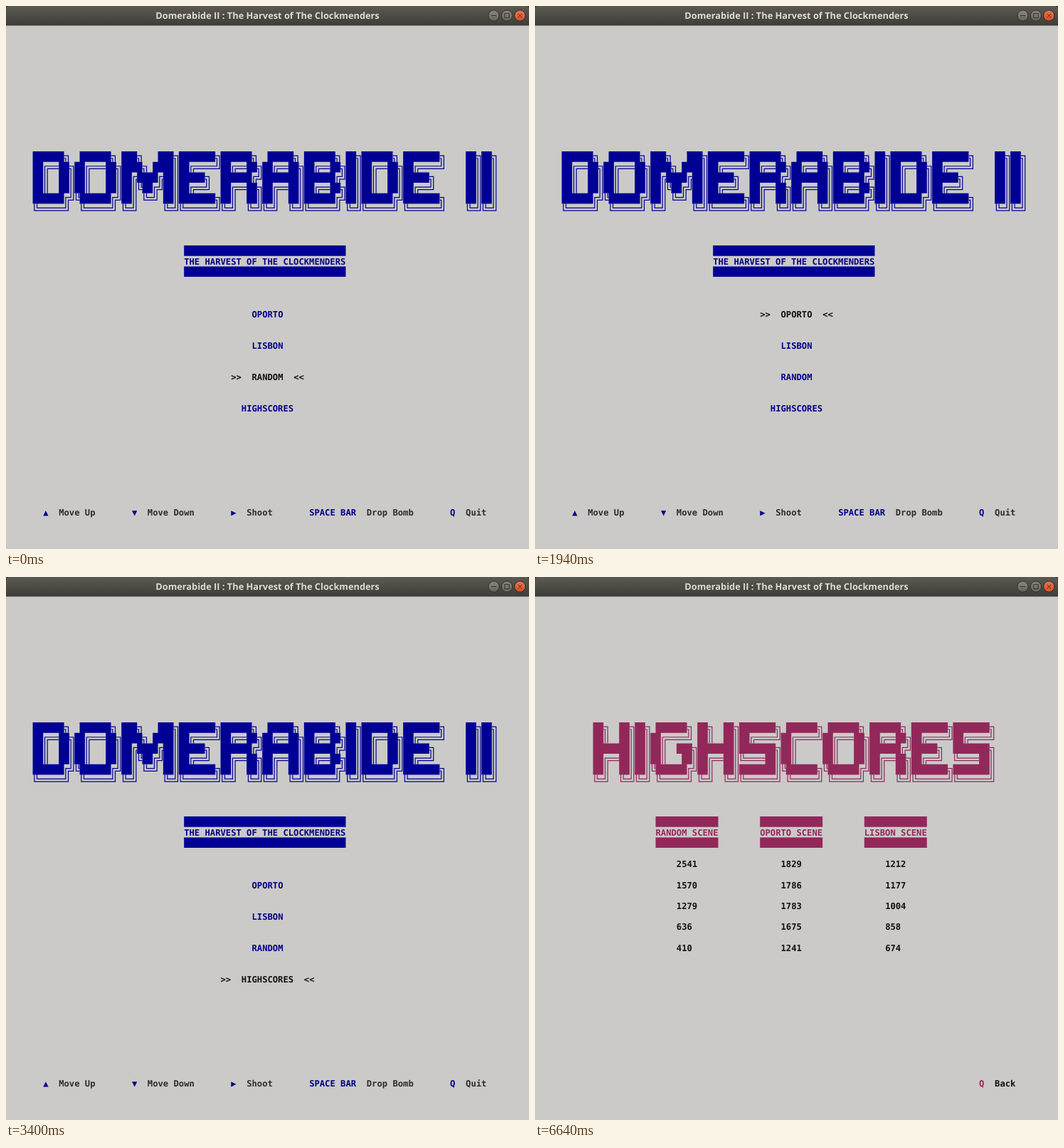
An HTML page that plays this animation: 735 by 762 pixels, repeating every 8 s.

```html
<!DOCTYPE html>
<html lang="en">
<head>
<meta charset="utf-8">
<title>Domerabide II</title>
<style>
  html, body { margin: 0; width: 100%; height: 100%; overflow: hidden; background: #cbcac8; }
  svg { display: block; width: 100vw; height: 100vh; }
  text { white-space: pre; text-rendering: geometricPrecision; }
  .cell { font: bold 12.18px "DejaVu Sans Mono", monospace; }
  .caption { font: bold 12.8px "Open Sans", sans-serif; fill: #dfdbd2; text-anchor: middle; }
</style>
</head>
<body>
<svg id="stage" viewBox="0 0 735 762" xmlns="http://www.w3.org/2000/svg">
  <defs>
    <linearGradient id="bar" x2="0" y2="1">
      <stop offset="0" stop-color="#5b5a52"/>
      <stop offset="1" stop-color="#3d3c37"/>
    </linearGradient>
    <linearGradient id="grey" x2="0" y2="1">
      <stop offset="0" stop-color="#8a887e"/>
      <stop offset="1" stop-color="#65635b"/>
    </linearGradient>
    <linearGradient id="red" x2="0" y2="1">
      <stop offset="0" stop-color="#f0774f"/>
      <stop offset="1" stop-color="#d94a22"/>
    </linearGradient>
  </defs>
  <rect width="735" height="762" fill="#cbcac8"/>
  <rect width="735" height="12" fill="#7c1a20"/>
  <path d="M0 27.6V5Q0 0 5 0H730Q735 0 735 5V27.6Z" fill="url(#bar)"/>
  <text class="caption" x="367.5" y="18">Domerabide II : The Harvest of The Clockmenders</text>
  <g stroke="#32312d" fill="none">
    <circle cx="685.5" cy="13.5" r="7.6" fill="url(#grey)"/>
    <circle cx="704" cy="13.5" r="7.6" fill="url(#grey)"/>
    <circle cx="722.3" cy="13.5" r="7.6" fill="url(#red)"/>
    <path d="M682 13.5h7M700.8 10.4h6.4v6.2h-6.4zM719.6 10.8l5.4 5.4m0-5.4l-5.4 5.4"/>
  </g>
</svg>
<script>
// Terminal grid of 100 x 50 cells, 8 x 16 units each, with a one unit margin
const UNIT = 735 / 802;
const CELL_W = 8 * UNIT, CELL_H = 16 * UNIT, LEFT = UNIT, TOP = 28.15;
const BLUE = '#000095', NAVY = '#00008a', INK = '#101010', GREY = '#2c2c2c', PLUM = '#92285a';
const LOOP = 8000, SCORES = 4;

// [start in ms, highlighted menu item or SCORES]
const STEPS = [[0, 2], [500, 1], [1400, 0], [2300, 1], [3100, 2], [3400, 3], [4600, SCORES]];

const FONT = {
  A: ' █████╗ /██╔══██╗/███████║/██╔══██║/██║  ██║/╚═╝  ╚═╝',
  B: '██████╗ /██╔══██╗/██████╔╝/██╔══██╗/██████╔╝/╚═════╝ ',
  C: ' ██████╗/██╔════╝/██║     /██║     /╚██████╗/ ╚═════╝',
  D: '██████╗ /██╔══██╗/██║  ██║/██║  ██║/██████╔╝/╚═════╝ ',
  E: '███████╗/██╔════╝/█████╗  /██╔══╝  /███████╗/╚══════╝',
  G: ' ██████╗ /██╔════╝ /██║  ███╗/██║   ██║/╚██████╔╝/ ╚═════╝ ',
  H: '██╗  ██╗/██║  ██║/███████║/██╔══██║/██║  ██║/╚═╝  ╚═╝',
  I: '██╗/██║/██║/██║/██║/╚═╝',
  M: '███╗   ███╗/████╗ ████║/██╔████╔██║/██║╚██╔╝██║/██║ ╚═╝ ██║/╚═╝     ╚═╝',
  O: ' ██████╗ /██╔═══██╗/██║   ██║/██║   ██║/╚██████╔╝/ ╚═════╝ ',
  R: '██████╗ /██╔══██╗/██████╔╝/██╔══██╗/██║  ██║/╚═╝  ╚═╝',
  S: '███████╗/██╔════╝/███████╗/╚════██║/███████║/╚══════╝',
  ' ': '    /    /    /    /    /    '
};

const stage = document.getElementById('stage');
const px = col => LEFT + col * CELL_W;
const py = row => TOP + row * CELL_H;

function add(parent, tag, attrs = {}) {
  const el = document.createElementNS('http://www.w3.org/2000/svg', tag);
  for (const key in attrs) el.setAttribute(key, attrs[key]);
  return parent.appendChild(el);
}

function write(parent, col, row, string, fill) {
  add(parent, 'text', { class: 'cell', x: px(col), y: py(row) + 12.5, fill }).textContent = string;
}

// Double-line box characters, drawn edge to edge inside one cell
function boxLines(char, col, row) {
  const l = px(col), r = px(col + 1), t = py(row), b = py(row + 1);
  const x1 = l + 2.5 * UNIT, x2 = l + 6.5 * UNIT, y1 = t + 6.5 * UNIT, y2 = t + 10.5 * UNIT;
  return {
    '═': `M${l} ${y1}H${r}M${l} ${y2}H${r}`,
    '║': `M${x1} ${t}V${b}M${x2} ${t}V${b}`,
    '╗': `M${l} ${y1}H${x2}V${b}M${l} ${y2}H${x1}V${b}`,
    '╔': `M${r} ${y1}H${x1}V${b}M${r} ${y2}H${x2}V${b}`,
    '╚': `M${x1} ${t}V${y2}H${r}M${x2} ${t}V${y1}H${r}`,
    '╝': `M${x2} ${t}V${y2}H${l}M${x1} ${t}V${y1}H${l}`
  }[char] || '';
}

function block(col, row, cols) {
  return `M${px(col)} ${py(row)}H${px(col + cols)}V${py(row + 1)}H${px(col)}z`;
}

function banner(parent, col, row, word, color) {
  let solid = '', lines = '';
  for (const letter of word) {
    const rows = FONT[letter].split('/');
    rows.forEach((line, j) => {
      for (const run of line.matchAll(/█+/g)) solid += block(col + run.index, row + j, run[0].length);
      [...line].forEach((char, i) => lines += boxLines(char, col + i, row + j));
    });
    col += rows[0].length;
  }
  add(parent, 'path', { d: solid, fill: color });
  add(parent, 'path', { d: lines, fill: 'none', stroke: color, 'stroke-width': 1.2 });
}

function heading(parent, col, string, color, ink = color) {
  const size = string.length;
  add(parent, 'path', { d: block(col, 21, size) + block(col, 23, size), fill: color });
  write(parent, col, 22, string, ink);
}

// A group that is visible only in the states accepted by the test
function layer(isShown) {
  const group = add(stage, 'g');
  const frames = STEPS.map(([start, state]) => ({
    offset: start / LOOP,
    visibility: isShown(state) ? 'visible' : 'hidden',
    easing: 'step-end'
  }));
  frames.push({ ...frames[frames.length - 1], offset: 1 });
  group.animate(frames, { duration: LOOP, iterations: Infinity });
  return group;
}

const menu = layer(state => state !== SCORES);
banner(menu, 5, 12, 'DOMERABIDE II', BLUE);
heading(menu, 34, 'THE HARVEST OF THE CLOCKMENDERS', BLUE, NAVY);
[
  [7, '▲', 10, 'Move Up'], [24, '▼', 27, 'Move Down'], [43, '▶', 46, 'Shoot'],
  [58, 'SPACE BAR', 69, 'Drop Bomb'], [85, 'Q', 88, 'Quit']
].forEach(([keyCol, key, col, label]) => {
  write(menu, keyCol, 46, key, NAVY);
  write(menu, col, 46, label, GREY);
});

['OPORTO', 'LISBON', 'RANDOM', 'HIGHSCORES'].forEach((name, i) => {
  const col = 50 - name.length / 2, row = 27 + 3 * i;
  const idle = layer(state => state !== i && state !== SCORES);
  const chosen = layer(state => state === i);
  write(idle, col, row, name, NAVY);
  write(chosen, col, row, name, INK);
  write(chosen, col - 4, row, '>>', INK);
  write(chosen, col + name.length + 2, row, '<<', INK);
});

const scores = layer(state => state === SCORES);
banner(scores, 11, 12, 'HIGHSCORES', PLUM);
[
  ['RANDOM SCENE', 2541, 1570, 1279, 636, 410],
  ['OPORTO SCENE', 1829, 1786, 1783, 1675, 1241],
  ['LISBON SCENE', 1212, 1177, 1004, 858, 674]
].forEach(([name, ...points], i) => {
  heading(scores, 23 + 20 * i, name, PLUM);
  points.forEach((value, j) => write(scores, 27 + 20 * i, 25 + 2 * j, value, INK));
});
write(scores, 85, 46, 'Q', PLUM);
write(scores, 88, 46, 'Back', INK);
</script>
</body>
</html>
```
